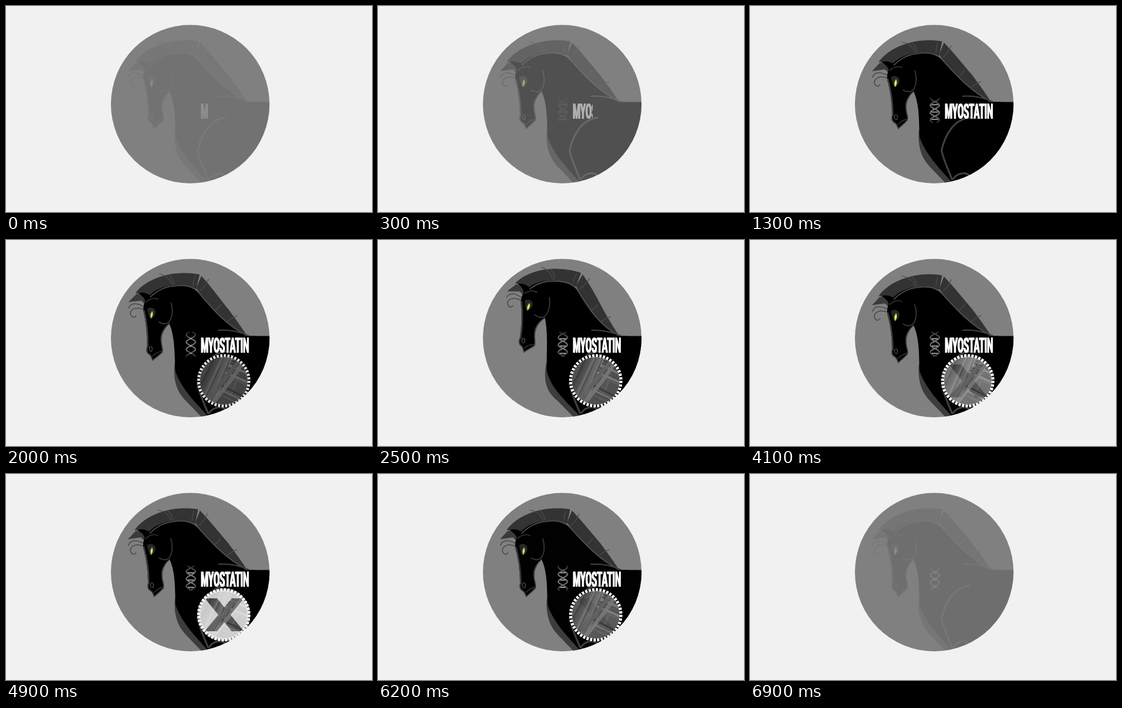
These frames come from a looping animation (600x338 px, 7 s). An HTML page:

```html
<!DOCTYPE html>
<html lang="en">
<head>
<meta charset="utf-8">
<title>Myostatin</title>
<style>
html, body { margin: 0; width: 100%; height: 100%; overflow: hidden; background: #f1f1f1; }
svg { display: block; width: 100vw; height: 100vh; }
.line { fill: none; stroke-linecap: round; stroke-linejoin: round; }
.horse, .gene, .word, .lens, .flash { animation: 7s linear infinite; }
.horse { animation-name: horse; }
.gene { animation-name: gene; }
.word { animation-name: word; }
.lens { animation-name: lens; }
.flash { animation-name: flash; }
.word text { font: 700 36px Roboto, "Liberation Sans", sans-serif; fill: #fff; text-anchor: middle; }

@keyframes horse {
  0% { opacity: .11; }
  14.29%, 88.57% { opacity: 1; }
  100% { opacity: .02; }
}
@keyframes gene {
  0% { opacity: 0; }
  14.29%, 100% { opacity: 1; }
}
@keyframes word {
  0% { opacity: 1; clip-path: inset(0 85% 0 0); }
  14.29%, 88.57% { opacity: 1; clip-path: inset(0 0 0 0); }
  97.5%, 100% { opacity: 0; clip-path: inset(0 0 0 0); }
}
@keyframes lens {
  0%, 20.7% { opacity: 0; }
  30%, 88.57% { opacity: 1; }
  97.5%, 100% { opacity: 0; }
}
@keyframes flash {
  0%, 55.7% { opacity: 0; }
  65.7%, 77.8% { opacity: 1; }
  88.57% { opacity: .08; }
  91%, 100% { opacity: 0; }
}
</style>
</head>
<body>
<svg viewBox="0 0 600 338">
  <defs>
    <clipPath id="badge"><circle cx="302" cy="161" r="130"/></clipPath>
    <clipPath id="hole"><circle cx="357" cy="231" r="39.5"/></clipPath>
    <mask id="cross">
      <rect x="310" y="185" width="95" height="95" fill="#fff"/>
      <path d="M326,204H346L390,258H370Z"/>
      <path d="M390,204H370L326,258H346Z"/>
    </mask>
    <linearGradient id="strand" gradientUnits="userSpaceOnUse" x1="0" y1="150" x2="0" y2="193">
      <stop offset="0" stop-color="#222"/>
      <stop offset=".3" stop-color="#777"/>
      <stop offset=".7" stop-color="#777"/>
      <stop offset="1" stop-color="#222"/>
    </linearGradient>
  </defs>

  <circle cx="302" cy="161" r="130" fill="#808080"/>

  <g clip-path="url(#badge)">
    <g class="horse">
      <g id="body">
        <!-- chest and mane -->
        <path fill="#3c3c3c" d="M277,203 C275,225 278,246 295,264 L322,292 L337,292 L300,248Z"/>
        <path fill="#333" d="M211,92 C222,75 250,59 285,56.5 C295,56 305,56 315,58 L310,82 C300,77 285,77 270,80 C255,84 244,90 237,97 L230,92Z"/>
        <path fill="#333" d="M318,60 C332,74 350,97 364,113 C376,129 386,143 395,157 C362,142 335,114 310,80Z"/>
        <!-- forelock -->
        <path fill="#3a3a3a" d="M213,93 L200,107 L221,104 L230,112 L236,97Z"/>
        <g class="line" stroke="#4a4a4a" stroke-width="1.5">
          <path d="M224,113 C212,107 203,109 201,117"/>
          <path d="M224,118 C210,113 201,121 205,129 C208,133 212,132 213,129"/>
        </g>
        <!-- neck, head and trunk -->
        <path d="M232,98 C240,86 258,78 276,77 C292,75 306,78 315,88 C338,114 362,140 395,157 C410,157.5 420,157.5 434,157.5 L434,296 L330,288 C312,268 288,244 278,215 C277,190 278,160 268,140 C260,146 254,157 255,167 C256,176 261,182 258,188 C253,192 248,196 243,202 C241,198 240,194 237,192 C232,190 231,184 233,179 C233,160 230,138 225,121 C224,111 227,103 232,98Z"/>
        <path d="M215,92 C224,89 232,92 239,97 L228,106 C226,99 221,95 215,92Z"/>
        <g class="line" stroke="#555" stroke-width="1.6">
          <path d="M236,97 C246,87 260,79 276,78 C294,75 306,78 315,88 C338,114 362,140 395,157"/>
          <path stroke="#3c3c3c" stroke-width="2.4" d="M226,120 C231,138 234,160 234,179"/>
          <path stroke="#3c3c3c" d="M234,179 C232,184 233,190 238,192 C241,194 242,198 243,201 C249,196 254,192 258,187 C260,182 255,174 256,167 C255,157 261,146 268,140"/>
          <path stroke="#3c3c3c" d="M270,106 C274,118 273,131 267,138 C263,142 257,141 251,138"/>
          <path stroke="#333" d="M229,106 C236,99 242,98 249,101"/>
          <path stroke="#333" d="M243,194 C247,190 252,187 257,186"/>
          <path stroke="#666" stroke-width="1" d="M237,180 C240,176 243,180 241,186 C238,188 236,184 237,180Z"/>
        </g>
        <!-- loose hairs -->
        <g class="line" stroke="#4d4d4d" stroke-width="1.2">
          <path d="M249,59 C260,61 268,68 271,76"/>
          <path d="M265,60 C271,65 273,70 274,76"/>
          <path d="M308,60 C306,66 305,71 305,76"/>
          <path d="M330,65 C327,73 322,79 317,84"/>
          <path d="M352,105 C350,109 346,113 342,116"/>
          <path d="M379,124 C373,126 368,129 363,133"/>
        </g>
        <!-- eye -->
        <path fill="#262626" d="M231,117 C238,112 246,116 245,124 C243,131 238,135 235,131Z"/>
        <path id="eye" fill="#d0d845" d="M239.5,120 C242,124 241,129 238,133 C235.5,128 236.5,124 239.5,120Z"/>
        <path fill="#f6f6b8" d="M239,123 C240,126 239.5,128 238.5,130 C237.5,127 238,125 239,123Z"/>
        <!-- muscle lines -->
        <g class="line" stroke="#404040" stroke-width="3">
          <path d="M360,183 C335,186 320,210 314,237 C318,255 325,268 331,284"/>
          <path d="M333,284 C340,273 354,272 361,279"/>
          <path stroke-width="2" d="M349,148 C365,147 382,150 398,157"/>
        </g>
      </g>

      <g class="gene line">
        <path id="helix" stroke="url(#strand)" stroke-width="2"/>
        <path id="rungs" stroke="#bbb" stroke-width="1.3"/>
      </g>

      <g class="word">
        <text transform="translate(358.4 185) scale(.395 1)">MYOSTATIN</text>
        <text transform="translate(359.6 185) scale(.395 1)" aria-hidden="true">MYOSTATIN</text>
      </g>

      <g class="lens">
        <circle cx="357" cy="231" r="44" fill="#000"/>
        <g clip-path="url(#hole)">
          <circle cx="357" cy="231" r="40" fill="#505050"/>
          <g id="fibres" class="line"></g>
        </g>
        <g class="flash">
          <circle cx="357" cy="231" r="40" fill="#fff" fill-opacity=".72" mask="url(#cross)"/>
          <circle cx="357" cy="231" r="41" fill="none" stroke="#fff" stroke-opacity=".5" stroke-width="4"/>
        </g>
        <circle cx="357" cy="231" r="41.3" fill="none" stroke="#fff" stroke-width="4.8" pathLength="88" stroke-dasharray="1.25 .75"/>
      </g>
    </g>
  </g>
</svg>
<script>
const LOOP = 7000;
const PIVOT = { x: 350, y: 190 };
const LIFT = 0.16;
const nod = [[0, 0], [1400, 0], [1600, -.1], [2000, .22], [2400, 1.12], [2500, 1],
             [3020, -.16], [3300, -.07], [3750, 0], [LOOP, 0]];
const sway = [[0, 0], [1400, 0], [2400, -3.5], [3050, -4.2], [3750, 0], [LOOP, 0]];
const $ = id => document.getElementById(id);
const clamp = v => Math.max(0, Math.min(1, v));

const parts = [...document.querySelectorAll('#body path')]
  .map(el => ({ el, d: el.getAttribute('d') }));

function sample(keys, t) {
  const i = keys.findIndex(k => k[0] > t);
  const [t0, a] = keys[i - 1], [t1, b] = keys[i];
  const u = (t - t0) / (t1 - t0);
  return a + (b - a) * u * u * (3 - 2 * u);
}

// The head turns fully; the bend fades out towards chest and withers.
function bend(x, y, lift, shift) {
  const w = clamp((220 - y - Math.max(0, x - 310) * .9 + Math.max(0, 275 - x) * 3) / 90);
  const s = Math.sin(LIFT * lift * w), c = Math.cos(LIFT * lift * w);
  const dx = x - PIVOT.x, dy = y - PIVOT.y;
  const swell = 7 * lift * Math.exp(-((x - 280) ** 2 + (y - 240) ** 2) / 300);
  const bx = PIVOT.x + dx * c - dy * s + shift * w - swell;
  const by = PIVOT.y + dx * s + dy * c;
  return bx.toFixed(2) + ',' + by.toFixed(2);
}

function poseHorse(lift, shift) {
  for (const { el, d } of parts)
    el.setAttribute('d', d.replace(/([\d.]+),([\d.]+)/g, (_, x, y) => bend(+x, +y, lift, shift)));
}

function drawHelix(phase) {
  const spread = y => 7.5 * Math.sin((y - 157) * Math.PI / 12 + phase);
  let left = '', right = '', rungs = '';
  for (let y = 151; y <= 191; y++) {
    const cmd = y === 151 ? 'M' : 'L', w = spread(y);
    left += `${cmd}${303 - w},${y}`;
    right += `${cmd}${303 + w},${y}`;
  }
  for (const y of [162, 174, 186]) {
    const w = Math.abs(spread(y)) * .7;
    rungs += `M${303 - w},${y}H${303 + w}`;
  }
  $('helix').setAttribute('d', left + right);
  $('rungs').setAttribute('d', rungs);
}

function drawFibres() {
  let seed = 7;
  const rand = () => (seed = seed * 16807 % 2147483647) / 2147483647;
  const bundle = (count, x0, y0, x1, y1, stepX, stepY) => {
    for (let i = 0; i < count; i++) {
      const p = document.createElementNS('http://www.w3.org/2000/svg', 'path');
      const g = Math.round(55 + rand() * 70);
      const ox = i * stepX, oy = i * stepY, sag = rand() * 6 - 3;
      p.setAttribute('d', `M${x0 + ox},${y0 + oy} Q${(x0 + x1) / 2 + ox + sag},${(y0 + y1) / 2 + oy + sag} ${x1 + ox * .8},${y1 + oy * .8}`);
      p.setAttribute('stroke', `rgb(${g},${g},${g})`);
      p.setAttribute('stroke-width', 1.5 + rand() * 2.5);
      $('fibres').append(p);
    }
  };
  bundle(14, 305, 262, 343, 188, 4.5, 0);
  bundle(9, 352, 238, 398, 262, 1, 4.5);
  bundle(7, 358, 222, 402, 240, 2, -4);
  bundle(4, 328, 266, 384, 194, 4, 1);
}

let start;
function frame(now) {
  start ??= now;
  const t = (now - start) % LOOP;
  poseHorse(sample(nod, t), sample(sway, t));
  drawHelix(Math.max(0, t - 1500) / 800 * Math.PI);
  $('eye').setAttribute('fill-opacity', .9 + .1 * Math.cos(t / 700 * Math.PI));
  requestAnimationFrame(frame);
}

drawFibres();
requestAnimationFrame(frame);
</script>
</body>
</html>
```
